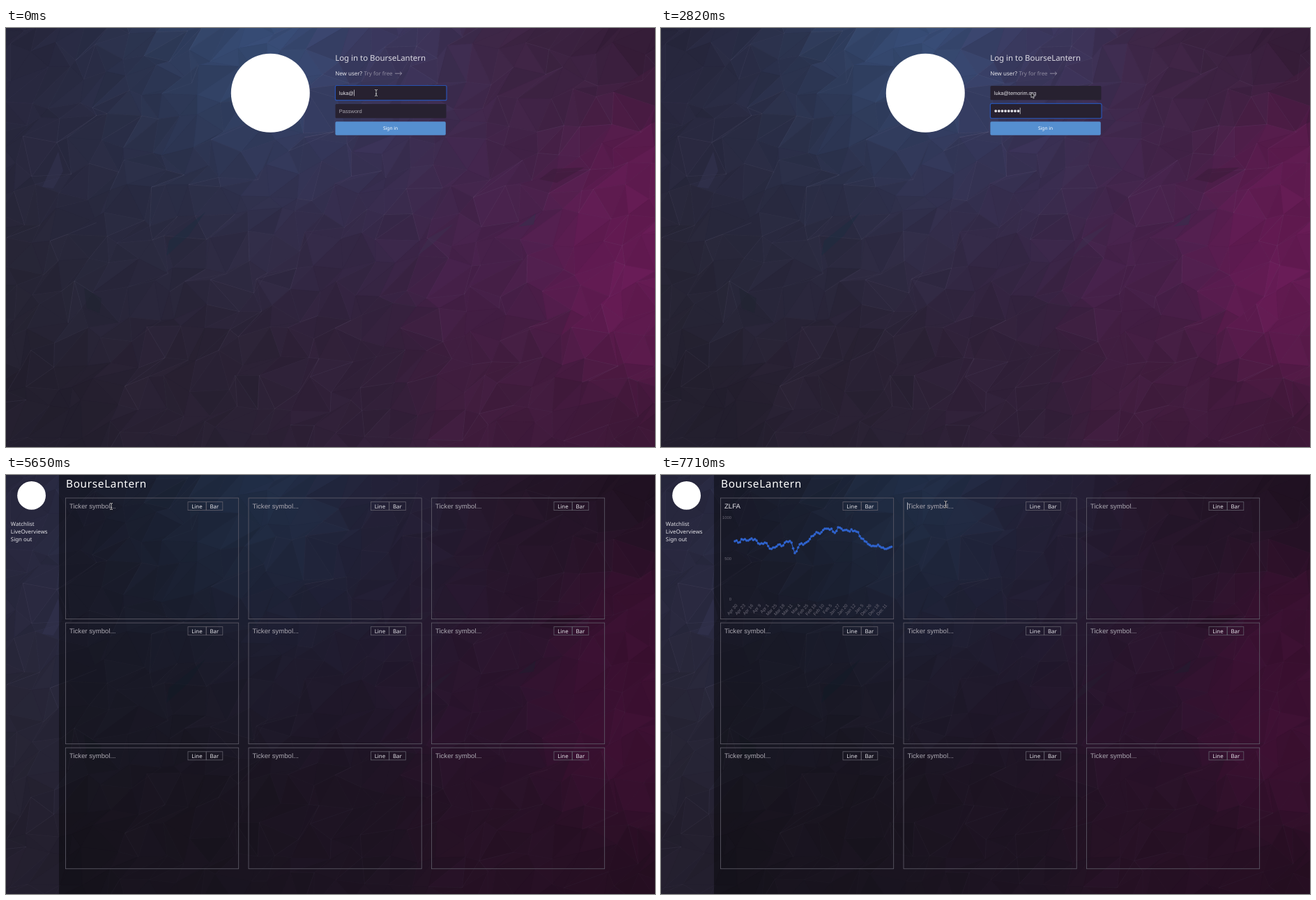
An HTML page that plays this animation: 931 by 601 pixels, repeating every 8000 ms.

```html
<!DOCTYPE html>
<html lang="en">
<head>
<meta charset="utf-8">
<title>Login and watchlist</title>
<style>
  html, body { margin: 0; width: 100%; height: 100%; overflow: hidden; background: #2a2135; }
  svg { display: block; width: 100vw; height: 100vh; }
  text { font-family: "Noto Sans", "Open Sans", sans-serif; text-rendering: geometricPrecision; white-space: pre; }
  .field { font-family: "Liberation Sans", Arial, sans-serif; }
</style>
</head>
<body>
<svg id="stage" viewBox="0 0 931 601"></svg>
<script>
const LOOP = 8000;
const BRAND = 'BourseLantern';
const USER = 'luka@', DOMAIN = 'temorim.org', TICKER = 'zlfa';
const HINT = '#aaa7b0', INK = '#e4e3e8', DIM = '#6d6a77';

const stage = document.getElementById('stage');

function add(parent, tag, attrs, content) {
  const node = document.createElementNS('http://www.w3.org/2000/svg', tag);
  for (const key in attrs) node.setAttribute(key, attrs[key]);
  if (content !== undefined) node.textContent = content;
  parent.appendChild(node);
  return node;
}
const group = (parent, attrs = {}) => add(parent, 'g', attrs);
const label = (parent, x, y, size, content, attrs = {}) =>
  add(parent, 'text', { x, y, 'font-size': size, fill: INK, ...attrs }, content);
const box = (parent, x, y, width, height, attrs) =>
  add(parent, 'rect', { x, y, width, height, ...attrs });
const show = (node, on) => node.setAttribute('display', on ? 'inline' : 'none');

function seeded(seed) {
  return () => (seed = (seed * 16807) % 2147483647) / 2147483647;
}

// Low-poly backdrop: tone anchors blended over a jittered triangle mesh
const TONES = [
  [0, 0, '#26253a'], [100, 60, '#282941'], [200, 20, '#2c3450'], [350, 0, '#38507a'],
  [395, 75, '#354c76'], [270, 90, '#2d3d5c'], [350, 175, '#2f3857'], [220, 190, '#2a304a'],
  [0, 160, '#28273d'], [110, 190, '#29293f'], [540, 30, '#3b365b'], [580, 160, '#3b2d50'],
  [460, 180, '#343557'], [750, 60, '#3d2443'], [931, 0, '#331c36'], [720, 200, '#442249'],
  [900, 230, '#5e1a4e'], [890, 340, '#6b1b58'], [931, 430, '#5c1a4c'], [690, 350, '#47204a'],
  [490, 300, '#352644'], [200, 310, '#28273b'], [0, 330, '#262434'], [340, 290, '#2f2a42'],
  [0, 600, '#231f2e'], [280, 500, '#292133'], [500, 500, '#302038'], [700, 500, '#411d3e'],
  [820, 590, '#3f193b'], [931, 600, '#3a1733']
].map(([x, y, hex]) => ({ x, y, rgb: [1, 3, 5].map(i => parseInt(hex.slice(i, i + 2), 16)) }));

function toneAt(x, y, gain) {
  const sum = [0, 0, 0];
  let total = 0;
  for (const tone of TONES) {
    const weight = Math.exp(-((x - tone.x) ** 2 + (y - tone.y) ** 2) / 10000) + 1e-6;
    total += weight;
    tone.rgb.forEach((c, i) => sum[i] += c * weight);
  }
  return `rgb(${sum.map(c => Math.round(c / total * gain)).join()})`;
}

function drawBackdrop() {
  const random = seeded(4127), cell = 34, cols = 31, rows = 21;
  const layer = group(stage, { 'stroke-width': 0.7, 'stroke-linejoin': 'round' });
  const mesh = Array.from({ length: rows }, (_, r) => Array.from({ length: cols }, (_, c) => [
    (c - 1) * cell + (r % 2) * 14 + (random() - 0.5) * 32,
    (r - 1) * cell + (random() - 0.5) * 30
  ]));
  let wires = '';
  const facet = points => {
    const x = points.reduce((s, p) => s + p[0], 0) / 3;
    const y = points.reduce((s, p) => s + p[1], 0) / 3;
    const fill = toneAt(x, y, 0.95 + random() * 0.1);
    const d = 'M' + points.map(p => p.map(v => v.toFixed(1)).join()).join('L') + 'Z';
    add(layer, 'path', { d, fill, stroke: fill });
    if (random() < 0.4) wires += d;
  };
  for (let r = 0; r < rows - 1; r++) {
    for (let c = 0; c < cols - 1; c++) {
      const a = mesh[r][c], b = mesh[r][c + 1], p = mesh[r + 1][c], q = mesh[r + 1][c + 1];
      facet([a, b, p]);
      facet([b, q, p]);
    }
  }
  add(layer, 'path', { d: wires, fill: 'none', stroke: '#b9b4e0', 'stroke-width': 0.5, opacity: 0.07 });
  const shard = (d, fill) => add(layer, 'path', { d, fill, opacity: 0.5 });
  shard('M230 327L234 305 286 264 262 298Z', '#1d2c40');
  shard('M590 327L606 301 642 281 614 308Z', '#3c3150');
  shard('M112 373L137 388 134 409 116 402Z', '#1d2430');
  shard('M735 285L760 266 757 282Z', '#33304c');
  shard('M765 217L785 202 830 200 790 222Z', '#3a1a38');
  shard('M52 228L75 177 82 205 68 230Z', '#343452');
}

function drawLogin() {
  const view = group(stage);
  add(view, 'circle', { cx: 379.3, cy: 93.3, r: 56.5, fill: '#fff' });
  label(view, 472.2, 46.5, 11.45, 'Log in to ' + BRAND, { fill: '#dddce4' });
  label(view, 472.2, 67.8, 8, 'New user?');
  label(view, 513.5, 67.8, 7.95, 'Try for free', { fill: '#8f8ba0' });
  add(view, 'path', { d: 'M558 65.2H567.5M565 62.8L567.7 65.2 565 67.6', fill: 'none', stroke: '#a19eb0', 'stroke-width': 0.8 });
  [83, 109].forEach(y => box(view, 472.5, y, 159, 20.3, { rx: 1.5, fill: '#272130' }));
  const focus = box(view, 472.4, 0, 159.7, 21.2, { rx: 2, fill: 'none', stroke: '#2752b0', 'stroke-width': 1.2 });
  box(view, 472.4, 134.3, 158.4, 19.4, { rx: 1.8, fill: '#558fd0' });
  label(view, 551.5, 146.4, 6.6, 'Sign in', { 'text-anchor': 'middle', fill: '#fff' });
  const email = label(view, 477.8, 95.8, 7.4, '', { class: 'field' });
  const hint = label(view, 477.8, 121.6, 7.5, 'Password', { class: 'field', fill: HINT });
  const dots = Array.from({ length: 8 }, (_, i) =>
    add(view, 'circle', { cx: 480.2 + i * 4.63, cy: 119.1, r: 1.9, fill: INK }));
  const caret = box(view, 0, 0, 0.7, 9, { fill: INK });
  return { view, focus, email, hint, dots, caret };
}

function drawChart(parent) {
  const chart = group(parent);
  const random = seeded(91);
  const keys = [95, 97, 92, 92, 94, 91, 92, 98, 98, 97, 102, 106, 104, 100, 102, 97, 96, 97, 112, 104,
    98, 98, 95, 88, 85, 83, 82, 77, 77, 77, 83, 75, 77, 79, 80, 78, 80, 82, 91, 95, 99, 102, 102, 100,
    104, 106, 105, 103];
  const step = 224.5 / (keys.length - 1);
  const points = [];
  keys.forEach((y, i) => {
    points.push([106 + i * step, y]);
    if (i < keys.length - 1) {
      points.push([106 + (i + 0.5) * step, (y + keys[i + 1]) / 2 + (random() - 0.5) * 4]);
    }
  });
  add(chart, 'polyline', { points: points.join(' '), fill: 'none', stroke: '#2f63cd', 'stroke-width': 1.1 });
  points.forEach(([cx, cy]) => add(chart, 'circle', { cx, cy, r: 1.8, fill: '#2f63cd' }));
  [1000, 500, 0].forEach((value, i) => label(chart, 101, 63.2 + i * 58.6, 5.8, value,
    { class: 'field', fill: DIM, 'text-anchor': 'end' }));
  const days = 'Apr 30,Apr 23,Apr 16,Apr 9,Apr 1,Mar 25,Mar 18,Mar 11,Mar 4,Feb 25,Feb 18,Feb 10,' +
    'Feb 5,Jan 27,Jan 20,Jan 12,Jan 5,Dec 26,Dec 18,Dec 11';
  days.split(',').forEach((day, i) => label(chart, 0, 0, 6.3, day, {
    class: 'field', fill: DIM, 'text-anchor': 'end',
    transform: `translate(${110 + i * 11.3} 187.5) rotate(-48)`
  }));
  return chart;
}

function drawDashboard() {
  const view = group(stage);
  box(view, 76, 0, 855, 601, { fill: '#000', opacity: 0.4 });
  add(view, 'circle', { cx: 36.6, cy: 29.4, r: 20.4, fill: '#fff' });
  ['Watchlist', 'LiveOverviews', 'Sign out'].forEach((item, i) => label(view, 6.8, 73.3 + i * 10.85, 7.9, item));
  label(view, 86, 18, 15.4, BRAND, { 'letter-spacing': 0.65, 'font-weight': 500, fill: '#fff' });
  const inputs = [];
  for (let row = 0; row < 3; row++) {
    for (let col = 0; col < 3; col++) {
      const panel = group(view, { transform: `translate(${85.5 + col * 262.5} ${33 + row * 179.1})` });
      const line = { fill: 'none', stroke: '#625f6b', 'stroke-width': 0.8 };
      box(panel, 0, 0, 248.2, 173.6, line);
      box(panel, 175.5, 5.6, 26.2, 12, line);
      box(panel, 201.7, 5.6, 23.6, 12, line);
      label(panel, 188.4, 14.5, 7.9, 'Line', { 'text-anchor': 'middle' });
      label(panel, 213.4, 14.5, 7.9, 'Bar', { 'text-anchor': 'middle' });
      inputs.push(label(panel, 5.5, 15.2, 9.55, 'Ticker symbol...', { class: 'field', fill: HINT }));
    }
  }
  const chart = drawChart(view);
  const caret = box(view, 0, 39.3, 0.8, 10.4, { fill: INK });
  return { view, input: inputs[0], chart, caret };
}

function drawPointer() {
  const arrow = add(stage, 'path', {
    d: 'M0 0V7.6L1.8 6 3 8.7 4.3 8.1 3.1 5.5H5.4Z', fill: '#15131a', stroke: '#e6e6ea', 'stroke-width': 0.7
  });
  const beam = group(stage, { fill: 'none' });
  const d = 'M-2 -4.6Q0 -4.6 0 -3.2Q0 -4.6 2 -4.6M0 -3.2V3.2M-2 4.6Q0 4.6 0 3.2Q0 4.6 2 4.6M-1 1.4H1';
  add(beam, 'path', { d, stroke: '#17151c', 'stroke-width': 1.9 });
  add(beam, 'path', { d, stroke: '#e6e6ea', 'stroke-width': 0.8 });
  return { arrow, beam };
}

drawBackdrop();
const login = drawLogin();
const board = drawDashboard();
const pointer = drawPointer();

// Number of evenly spaced changes that have happened by time t
function stepsDone(t, start, end, count) {
  if (t < start) return 0;
  return Math.min(count, Math.floor((t - start) / (end - start) * (count - 1) + 1e-6) + 1);
}
const ease = p => { p = Math.min(1, p); return p * p * (3 - 2 * p); };

function setPointer(x, y, beam) {
  const transform = `translate(${x} ${y})`;
  pointer.arrow.setAttribute('transform', transform);
  pointer.beam.setAttribute('transform', transform);
  show(pointer.arrow, !beam);
  show(pointer.beam, beam);
}

function updateLogin(t) {
  const name = stepsDone(t, 300, 740, 4), tail = stepsDone(t, 1040, 1480, 4);
  const typed = tail ? [8, 10, 11, 11][tail - 1] : [0, 2, 4, 6, 7][name];
  const onPassword = tail === 4;
  const count = stepsDone(t, 1780, 2820, 8);
  login.email.textContent = USER + DOMAIN.slice(0, typed);
  login.focus.setAttribute('y', onPassword ? 108.3 : 82.5);
  show(login.hint, !count);
  login.dots.forEach((dot, i) => show(dot, i < count));
  const caretX = onPassword ? 477.8 + count * 4.63 : 478 + login.email.getComputedTextLength();
  login.caret.setAttribute('x', caretX);
  login.caret.setAttribute('y', onPassword ? 114.4 : 88.6);
  if (t < 2820) setPointer(531, 93, true);
  else setPointer(531, 92.3, false);
}

function updateBoard(t) {
  const loaded = t >= 6820;
  const typed = stepsDone(t, 6090, 6528, 4);
  const value = loaded ? TICKER.toUpperCase() : TICKER.slice(0, typed);
  board.input.textContent = value || 'Ticker symbol...';
  board.input.setAttribute('fill', value ? INK : HINT);
  show(board.chart, loaded);

  const first = stepsDone(t, 4460, 5200, 6), second = stepsDone(t, 7110, 7710, 5);
  const focused = first === 6 && !(t >= 5650 && t < 6090) && !(t >= 6675 && t < 6820);
  show(board.caret, second ? second === 5 : focused);
  const width = value ? board.input.getComputedTextLength() : 0;
  board.caret.setAttribute('x', second ? 353.3 : 90.8 + width);

  if (second) {
    const p = ease(second / 4);
    setPointer(151 + 257.5 * p, 45 - 3 * p - 30 * Math.sin(Math.PI * p), second >= 4);
  } else {
    const p = ease(first / 5);
    setPointer(531 - 380 * p, 92.3 - 47.3 * p, first >= 5);
  }
}

function update(t) {
  const signedIn = t >= 3560;
  show(login.view, !signedIn);
  show(board.view, signedIn);
  (signedIn ? updateBoard : updateLogin)(t);
}

const origin = performance.now();
function frame() {
  update((performance.now() - origin) % LOOP);
  requestAnimationFrame(frame);
}
frame();
</script>
</body>
</html>
```
